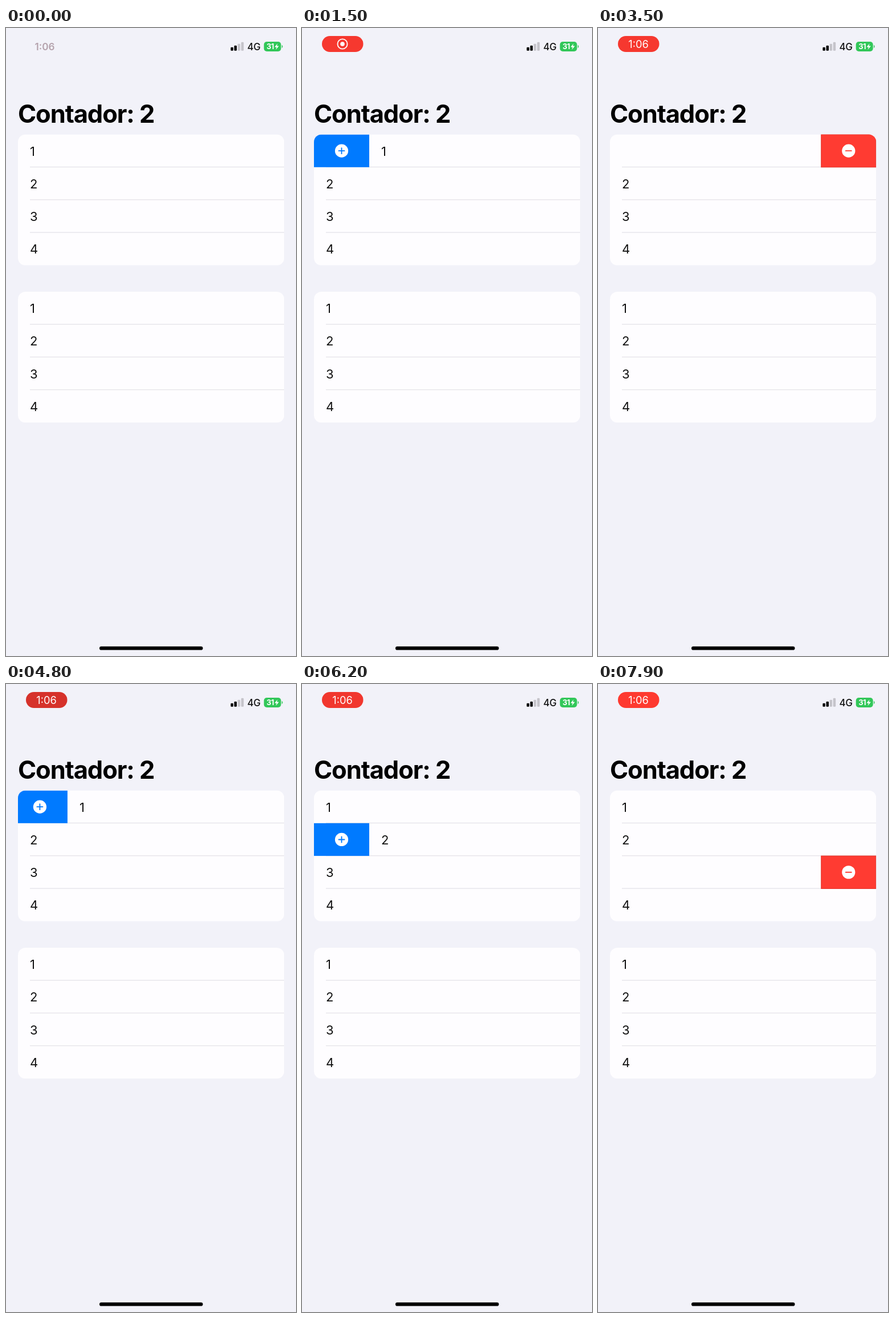
Recreate the animation shown at these times as an HTML page. Size 509 by 1100 pixels, loop 8000 ms.

```html
<!DOCTYPE html>
<html lang="es">
<head>
<meta charset="utf-8">
<title>Contador</title>
<style>
html, body { margin: 0; width: 100%; height: 100%; overflow: hidden; background: #f2f2f9; }
svg { display: block; width: 100vw; height: 100vh; }
text { font-family: Inter, Roboto, sans-serif; }
.row { font-size: 22px; fill: #111; }
</style>
</head>
<body>
<svg id="stage" viewBox="0 0 509 1100">
  <defs>
    <clipPath id="card0"><rect x="21" y="186.5" width="467.3" height="229.2" rx="13"/></clipPath>
    <clipPath id="card1"><rect x="21" y="462" width="467.3" height="229.2" rx="13"/></clipPath>
  </defs>
  <rect width="509" height="1100" fill="#f2f2f9"/>

  <text id="clock" x="68" y="38.6" font-size="17.2" font-weight="600" text-anchor="middle" fill="#b5a3ad">1:06</text>
  <g id="pill">
    <rect id="pillBg" x="35" y="14" width="72.5" height="28" rx="14"/>
    <g id="rec">
      <circle cx="71" cy="28" r="8.6" fill="none" stroke="#fff" stroke-width="1.8"/>
      <circle cx="71" cy="28" r="3.8" fill="#fff"/>
    </g>
    <text id="pillTime" x="71" y="34.6" font-size="18.3" text-anchor="middle" fill="#fff">1:06</text>
  </g>

  <g id="bars"></g>
  <text x="423.5" y="39" font-size="17" font-weight="500" letter-spacing="-0.4" fill="#111">4G</text>
  <rect x="452.7" y="24" width="30" height="17" rx="5" fill="#32c759"/>
  <path d="M484 29.8q1.6 .8 1.6 2.7t-1.6 2.7z" fill="#32c759"/>
  <text x="457.2" y="37.2" font-size="13" font-weight="700" letter-spacing="-0.6" fill="#fff">31</text>
  <path d="M476.6 27.2l-5.2 6.2h3.5l-1.3 4.6 5.4-6.4h-3.6z" fill="#fff"/>

  <text id="title" x="21" y="166" font-size="43.5" font-weight="700" letter-spacing="-1.1">Contador: 2</text>
  <g id="lists"></g>
  <rect x="164" y="1083.3" width="181.5" height="6.2" rx="3.1"/>
</svg>
<script>
const LOOP = 8000, STEP = 100, OPEN = 97;
const LEFT = 21, RIGHT = 488.3, PITCH = 57.3, MID = 48.5;
const $ = id => document.getElementById(id);

function make(tag, parent, attrs, label) {
  const el = document.createElementNS('http://www.w3.org/2000/svg', tag);
  set(el, attrs);
  if (label) el.textContent = label;
  return parent.appendChild(el);
}
function set(el, attrs) {
  for (const k in attrs) el.setAttribute(k, attrs[k]);
}
const clamp = p => Math.max(0, Math.min(1, p));
const smooth = (t, start, dur) => {
  const p = clamp((t - start) / dur);
  return p * p * (3 - 2 * p);
};

// Swipes per row: [start, duration, change in offset]
const swipes = [
  [[720, 400, OPEN], [1900, 380, -OPEN], [2560, 420, -OPEN], [3690, 380, OPEN],
   [4464, 420, OPEN], [5397, 274, -OPEN]],
  [[5397, 350, OPEN], [6723, 274, -OPEN]],
  [[6723, 350, -OPEN]],
  []
];
const offset = (row, t) => swipes[row].reduce((x, [s, d, by]) => x + by * smooth(t, s, d), 0);

function button(parent, y, color, edge, icon) {
  const g = make('g', parent, {});
  const bg = make('rect', g, { y, height: PITCH, fill: color, stroke: edge });
  const mark = make('g', g, {});
  make('circle', mark, { r: 11.6, fill: '#fff' });
  make('path', mark, { d: icon, stroke: color, 'stroke-width': 1.9, 'stroke-linecap': 'round' });
  return { g, bg, mark };
}

function buildCard(n, top) {
  const card = make('g', $('lists'), { 'clip-path': `url(#card${n})` });
  make('rect', card, { x: LEFT, y: top, width: RIGHT - LEFT, height: 4 * PITCH, fill: '#fefdff' });
  for (let i = 1; i < 4; i++) {
    make('rect', card, { x: 42, y: top + i * PITCH - 0.9, width: RIGHT - 42, height: 1.2, fill: '#e3e2e7' });
  }
  return [0, 1, 2, 3].map(i => {
    const y = top + i * PITCH;
    return {
      cy: y + PITCH / 2,
      text: make('text', card, { class: 'row', x: 42, y: y + 37 }, String(i + 1)),
      add: button(card, y, '#007aff', 'none', 'M-5 0H5M0-5V5'),
      sub: button(card, y, '#ff3b32', '#e52c22', 'M-5 0H5')
    };
  });
}

function showButton(b, shown, x, width, cx, cy) {
  b.g.style.display = shown ? '' : 'none';
  set(b.bg, { x, width });
  set(b.mark, { transform: `translate(${cx} ${cy})` });
}

[6, 9, 12, 15].forEach((h, i) => make('rect', $('bars'), {
  x: 394.4 + i * 6.1, y: 39.8 - h, width: 4.5, height: h, rx: 1.2, fill: i < 2 ? '#000' : '#c5c4ca'
}));
const rows = buildCard(0, 186.5);
buildCard(1, 462).forEach(r => {
  showButton(r.add, false, 0, 0, 0, 0);
  showButton(r.sub, false, 0, 0, 0, 0);
});

function drawPill(t) {
  const show = smooth(t, 0, 500);
  const swap = smooth(t, 2400, 400);
  const glow = (1 - Math.cos((t - 4810) / 1000 * Math.PI)) / 2;
  const mix = (a, b) => Math.round(a + (b - a) * glow);
  const scale = 0.6 + 0.4 * show;
  set($('clock'), { opacity: 1 - smooth(t, 0, 250) });
  set($('pill'), { opacity: show, transform: `translate(71 28) scale(${scale}) translate(-71 -28)` });
  set($('pillBg'), { fill: `rgb(${mix(214, 255)},${mix(50, 58)},${mix(43, 48)})` });
  set($('rec'), { opacity: 1 - swap });
  set($('pillTime'), { opacity: swap });
}

function draw(t) {
  drawPill(t);
  rows.forEach((r, i) => {
    const x = offset(i, t);
    set(r.text, { x: 42 + x });
    showButton(r.add, x > 0.3, LEFT, Math.max(0, x), LEFT + x - MID, r.cy);
    showButton(r.sub, x < -0.3, RIGHT + x + 0.5, Math.max(0, -x - 1), RIGHT + x + MID, r.cy);
  });
}

const began = performance.now();
function tick() {
  const t = (performance.now() - began) % LOOP;
  draw(Math.floor(t / STEP) * STEP);
  requestAnimationFrame(tick);
}
draw(0);
requestAnimationFrame(tick);
</script>
</body>
</html>
```
